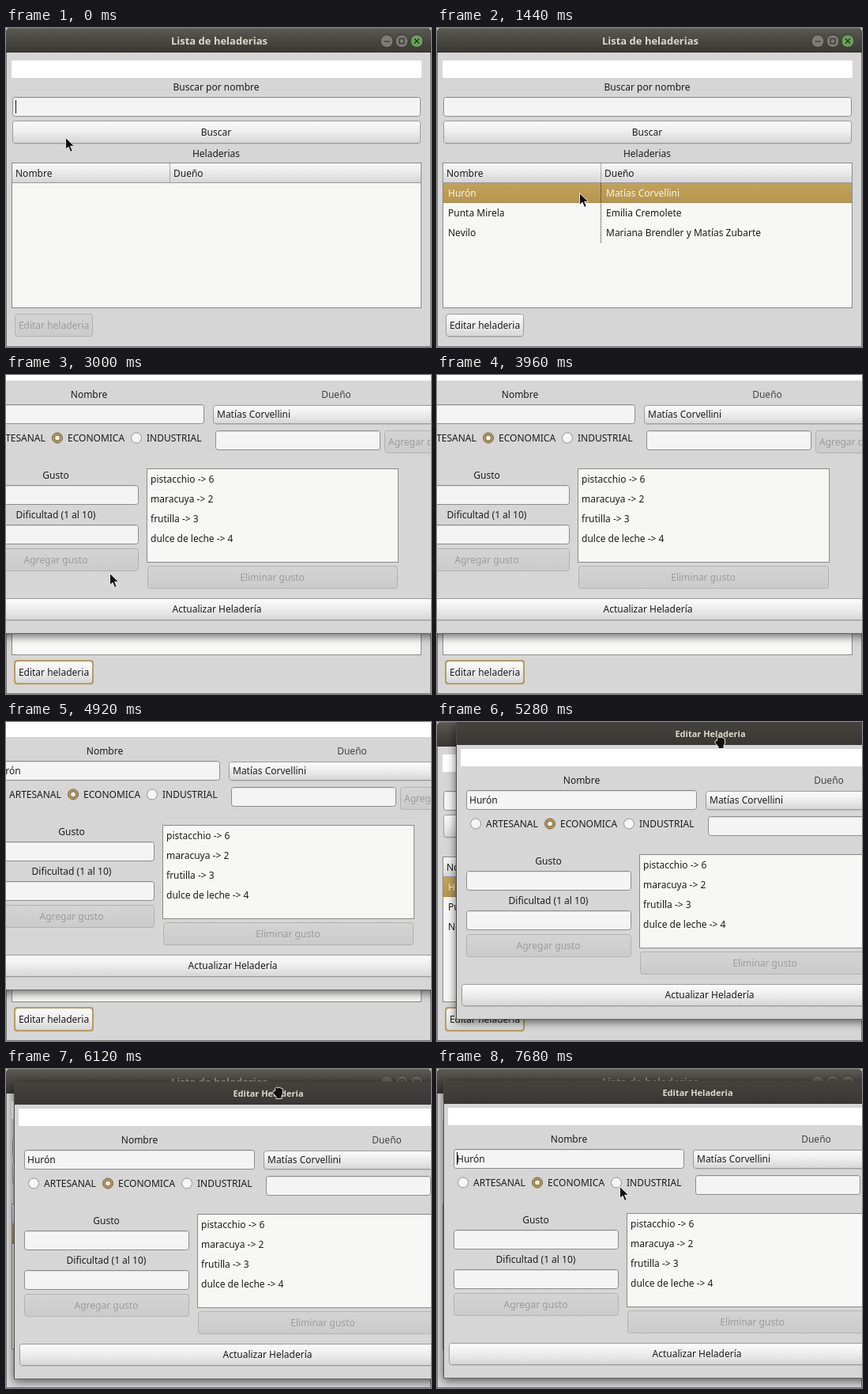
Animation, 538 px wide and 403 px high, one loop 8000 ms. Source, as an HTML page:

```html
<!DOCTYPE html>
<html lang="es">
<head>
<meta charset="utf-8">
<title>Lista de heladerias</title>
<style>
html, body { margin: 0; width: 100%; height: 100%; overflow: hidden; background: #d0d0d0; }
svg { display: block; width: 538px; height: 403px; }
text { font: 12px "Noto Sans", "Open Sans", sans-serif; fill: #1c1c1c; white-space: pre; }
.mid { text-anchor: middle; }
.title { font-weight: bold; font-size: 13px; fill: #dcd8cc; }
.small { font-size: 11px; }
.off { fill: #9c9c9c; }
.soft { fill: #444; }
.picked { fill: #f8f4ea; }
</style>
</head>
<body>
<svg id="stage" viewBox="0 0 538 403" xmlns="http://www.w3.org/2000/svg"></svg>
<script>
const LOOP = 8000, STEP = 120;
const OWNER = "Matías Corvellini", SHOP = "Hurón";
const SHOPS = [[SHOP, OWNER], ["Punta Mirela", "Emilia Cremolete"],
  ["Nevilo", "Mariana Brendler y Matías Zubarte"]];
const FLAVOURS = ["pistacchio -> 6", "maracuya -> 2", "frutilla -> 3", "dulce de leche -> 4"];

// [time, x, y]
const POINTER = [
  [0, 75, 138], [240, 75, 138], [840, 160, 273], [1200, 150, 211], [1440, 180, 208],
  [1680, 180, 208], [1920, 377, 240], [2400, 75, 376], [2520, 85, 376], [2640, 85, 376],
  [2760, 105, 323], [3480, 182, 105], [3840, 262, -20], [4800, 273, -43], [5280, 351, 18],
  [5640, 345, 24], [6120, 337, 22], [6240, 335, 21], [6480, 205, 75], [6600, 109, 103],
  [6720, 109, 103], [7080, 45, 112], [7200, 45, 112], [7680, 231, 148]
];
const DIALOG = [[4800, -54, -49], [5280, 24, 0], [5640, 18, 18], [6120, 10, 16], [6240, 8, 15]];

const text = (x, y, s, cls = "") =>
  `<text x="${x}" y="${y}" class="${cls}">${s.replace(/>/g, "&gt;")}</text>`;
const mid = (x, y, s, cls = "") => text(x, y, s, "mid " + cls);
const fill = (x, y, w, h, color, more = "") =>
  `<rect x="${x}" y="${y}" width="${w}" height="${h}" fill="${color}" ${more}/>`;
// Outlined box given by its first and last pixel
const box = (x, y, x2, y2, color, line, r = 0) =>
  fill(x + .5, y + .5, x2 - x, y2 - y, color, `stroke="${line}" rx="${r}"`);
const line = (x, y, x2, y2, color, more = "") =>
  `<path d="M${x} ${y}L${x2} ${y2}" stroke="${color}" ${more}/>`;
const group = (id, body, more = "") => `<g id="${id}" ${more}>${body}</g>`;
const grad = (id, ...stops) => `<linearGradient id="${id}" x2="0" y2="1">` +
  stops.map((c, i) => `<stop offset="${i / (stops.length - 1)}" stop-color="${c}"/>`).join("") +
  `</linearGradient>`;

const entry = (x, y, x2, y2) => box(x, y, x2, y2, "#f4f4f4", "#8c8c8c", 3) +
  line(x + 2, y + 1.5, x2 - 1, y + 1.5, "#dcdcdc");
const button = (x, y, x2, y2) => box(x, y, x2, y2, "url(#btn)", "#9a9a9a", 3) +
  line(x + 3, y2 + 1.5, x2 - 2, y2 + 1.5, "#c2c2c2");
const dead = (x, y, x2, y2) => box(x, y, x2, y2, "url(#dead)", "#b2b2b2", 3);
const ring = (x, y, x2, y2) => fill(x, y, x2 - x, y2 - y, "none",
  'stroke="#b59c62" stroke-width="2" rx="3"');
const radio = (x, s, on) =>
  `<circle cx="${x}" cy="128.5" r="6.5" fill="${on ? "#b89a5a" : "#f6f6f6"}" stroke="${on ? "#75623a" : "#929292"}"/>` +
  (on ? `<circle cx="${x}" cy="128.5" r="3.6" fill="#f6f2e8" stroke="#6d5c3c"/>` : "") +
  text(x + 13, 133, s);
const knob = (x, color, mark, ink) =>
  `<circle cx="${x}" cy="16.5" r="8" fill="${color}" stroke="#34332f"/>` +
  `<path d="${mark}" transform="translate(${x} 16.5)" fill="none" stroke="${ink}" stroke-width="1.3"/>`;
const knobs = close =>
  knob(482, "#7c7b75", "M-3.5 .5H3.5", "#393833") +
  knob(501, "#7c7b75", "M-3-3H3V3H-3Z", "#393833") +
  knob(520, close, "M-3-3L3 3M3-3L-3 3", "#25301d");

const defs = "<defs>" +
  grad("bar", "#5a5953", "#484741", "#393834") + grad("bar2", "#43423d", "#393834") +
  grad("btn", "#fcfcfc", "#ececec", "#d6d6d6") + grad("dead", "#d4d4d4", "#cbcbcb") +
  grad("down", "#acacac", "#bcbcbc") + grad("head", "#f8f8f8", "#e9e9e9", "#d6d6d6") +
  grad("pick", "#c1a25b", "#b6964f") +
  '<filter id="blur" x="-10%" y="-10%" width="120%" height="120%"><feGaussianBlur stdDeviation="6"/></filter></defs>';

const list = SHOPS.map(([name, owner], i) => {
  const y = 213 + 25 * i, cls = i ? "" : "first";
  return text(14, y, name, cls) + text(214, y, owner, cls);
}).join("");

const main =
  fill(0, 0, 538, 403, "#d6d6d6", 'rx="5"') +
  '<path d="M0 31V5Q0 0 5 0H533Q538 0 538 5V31Z" fill="url(#bar)"/>' +
  line(5, .5, 533, .5, "#6b6a64") + line(0, 30.5, 538, 30.5, "#33322e") +
  group("active", mid(270, 21, "Lista de heladerias", "title") + knobs("#6aa05a")) +
  group("idle", `<g opacity=".45">${mid(270, 21, "Lista de heladerias", "title") + knobs("#7c7b75")}</g>`) +
  line(.5, 31, .5, 403, "#777") + line(537.5, 31, 537.5, 403, "#777") + line(0, 402.5, 538, 402.5, "#777") +
  fill(7, 41, 519, 22, "#fff") +
  mid(266, 79, "Buscar por nombre") + entry(8, 87, 524, 111) +
  group("searchCaret", line(12.5, 91, 12.5, 108, "#111")) +
  button(8, 117, 524, 145) +
  group("searchDown", box(8, 117, 524, 145, "url(#down)", "#777", 3)) +
  group("searchRing", ring(8, 117, 525, 146)) +
  mid(266, 136, "Buscar") + mid(266, 163, "Heladerias") +
  box(7, 170, 525, 353, "#f7f7f6", "#8a8a8a") +
  fill(8, 171, 517, 24, "url(#head)") +
  line(8, 195.5, 525, 195.5, "#999") + line(207.5, 171, 207.5, 195, "#aaa") +
  text(12, 188, "Nombre") + text(212, 188, "Dueño") +
  group("rows", group("pickRow", fill(8, 196, 517, 25, "url(#pick)") +
    line(8, 220.5, 525, 220.5, "#a5864a")) + list +
    line(207.5, 196, 207.5, 271, "#222", 'stroke-dasharray="1 1"')) +
  group("editOff", dead(11, 361, 109, 389) + mid(60.5, 380, "Editar heladeria", "off")) +
  group("editOn", button(11, 361, 109, 389) +
    group("editDown", box(12, 362, 108, 388, "url(#down)", "#6f6f6f", 3)) +
    group("editRing", ring(11, 361, 110, 390)) + mid(60.5, 380, "Editar heladeria"));

const dialog =
  fill(0, 3, 644, 376, "#000", 'opacity=".6" filter="url(#blur)"') +
  fill(0, 0, 644, 376, "#d6d6d6", 'rx="2"') +
  fill(0, 0, 644, 29, "url(#bar2)") + line(0, 28.5, 644, 28.5, "#33322e") +
  mid(322, 19, "Editar Heladeria", "title small") +
  line(.5, 0, .5, 376, "#4a4a48") + line(0, 375.5, 644, 375.5, "#666") +
  fill(6, 34, 632, 22, "#fff") +
  mid(159, 78, "Nombre") + mid(472, 78, "Dueño", "soft") +
  entry(13, 86, 304, 110) + text(17, 103, SHOP) +
  group("nameCaret", line(17.5, 90, 17.5, 106, "#111")) +
  button(316, 87, 628, 110) + text(321, 103, OWNER) +
  radio(25, "ARTESANAL") + radio(119, "ECONOMICA", true) + radio(219, "INDUSTRIAL") +
  entry(319, 119, 527, 143) + dead(533, 119, 630, 147) + text(538, 138, "Agregar dueño", "off") +
  mid(117, 180, "Gusto") + entry(13, 188, 221, 212) +
  mid(117, 230, "Dificultad (1 al 10)") + entry(13, 238, 221, 262) +
  dead(13, 268, 221, 296) + mid(117, 287, "Agregar gusto", "off") +
  box(232, 167, 550, 285, "#f7f7f6", "#8a8a8a") +
  FLAVOURS.map((s, i) => text(237, 185 + 25 * i, s)).join("") +
  dead(233, 290, 549, 318) + mid(391, 309, "Eliminar gusto", "off") +
  button(7, 331, 636, 358) + mid(321, 349, "Actualizar Heladería");

const pointer =
  group("arrow", '<path d="M.5.5V15.5L4 12.2L6.6 18.4L9.2 17.2L6.6 11.3H11.5Z" fill="#111" stroke="#f4f4f4" stroke-width=".9"/>') +
  group("hand", '<path d="M3.5 2.5L5.5 1L7 2L9 1L11 2.2L13.5 3V9L12 12V15.5H5V13L1 8.5V6L3.5 5.5Z" fill="#111" stroke="#f4f4f4" stroke-width=".9"/>') +
  group("beam", '<path d="M-3.5-9H-1L0-8L1-9H3.5M0-8V8M-3.5 9H-1L0 8L1 9H3.5" fill="none" stroke="#111" stroke-width="1.4"/>');

const stage = document.getElementById("stage");
stage.innerHTML = defs + main + group("dialog", dialog) + group("pointer", pointer);

const parts = {};
stage.querySelectorAll("g[id]").forEach(g => parts[g.id] = g);
const first = stage.querySelectorAll(".first");

const show = (id, on) => parts[id].setAttribute("display", on ? "inline" : "none");
const within = (t, a, b) => t >= a && t < b;

function along(keys, t) {
  const i = keys.findIndex(k => k[0] > t);
  if (i < 1) return (i ? keys[keys.length - 1] : keys[0]).slice(1);
  const a = keys[i - 1], b = keys[i], p = (t - a[0]) / (b[0] - a[0]);
  return [1, 2].map(n => Math.round(a[n] + (b[n] - a[n]) * p));
}
const place = (id, keys, t) =>
  parts[id].setAttribute("transform", `translate(${along(keys, t)})`);

function draw(time) {
  // The screen refreshes in fixed ticks
  const t = Math.floor(time % LOOP / STEP) * STEP;
  const picked = t >= 1200, open = t >= 2880;
  show("active", !open);
  show("idle", open);
  show("searchCaret", t < 120);
  show("searchDown", within(t, 120, 360));
  show("searchRing", within(t, 120, 1200));
  show("rows", t >= 360);
  show("pickRow", picked);
  first.forEach(el => el.classList.toggle("picked", picked));
  show("editOff", !picked);
  show("editOn", picked);
  show("editDown", within(t, 2400, 2880));
  show("editRing", t >= 2400);
  show("dialog", open);
  show("nameCaret", within(t, 6960, 7320) || t >= 7680);

  const hand = within(t, 4800, 6360), beam = within(t, 6600, 7440);
  show("hand", hand);
  show("beam", beam);
  show("arrow", !hand && !beam);
  place("dialog", DIALOG, t);
  place("pointer", POINTER, t);
}

const start = performance.now();
function tick() {
  draw(performance.now() - start);
  requestAnimationFrame(tick);
}
tick();
</script>
</body>
</html>
```
